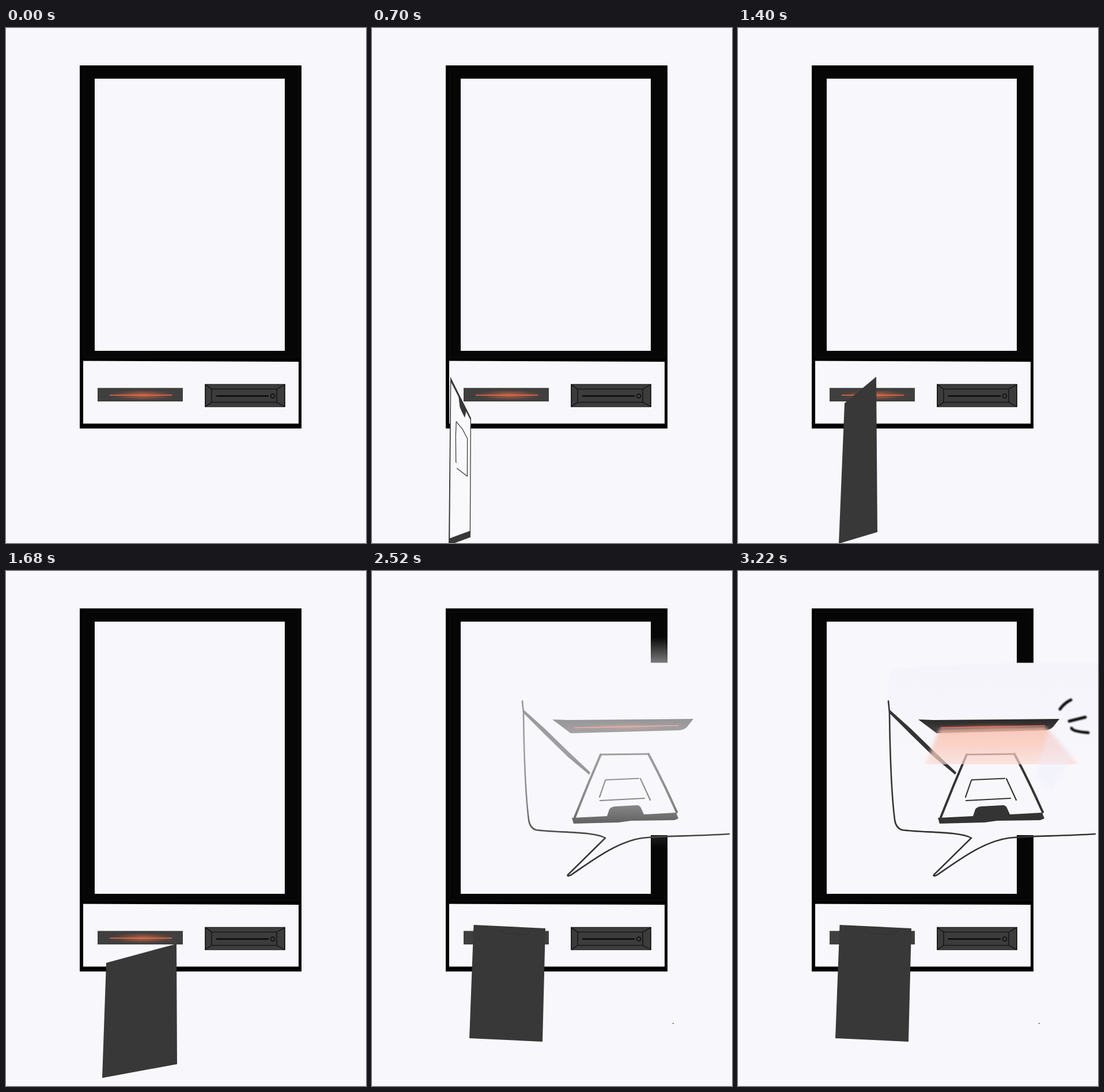
An HTML page for the animation above (3.36 s loop, 625x895 px).

```html
<!DOCTYPE html>
<html lang="en">
<head>
<meta charset="utf-8">
<title>Badge scan at a kiosk</title>
<style>
  html, body { margin: 0; width: 100%; height: 100%; overflow: hidden; background: #f8f8fc; }
  svg { display: block; width: 100vw; height: 100vh; }
  .ink { fill: none; stroke: #343434; stroke-linecap: round; stroke-linejoin: round; }
</style>
</head>
<body>
<svg viewBox="0 0 625 895">
  <defs>
    <radialGradient id="glow">
      <stop offset="0" stop-color="#e8744f" stop-opacity=".75"/>
      <stop offset=".5" stop-color="#b9603f" stop-opacity=".4"/>
      <stop offset="1" stop-color="#403f3f" stop-opacity="0"/>
    </radialGradient>
    <linearGradient id="panel" x2="0" y2="1">
      <stop offset="0" stop-color="#f4f4fa"/>
      <stop offset=".5" stop-color="#f5f5fb"/>
      <stop offset="1" stop-color="#f8f8fc"/>
    </linearGradient>
    <linearGradient id="haze" x2="0" y2="1">
      <stop offset="0" stop-color="#f8f8fc" stop-opacity="0"/>
      <stop offset=".12" stop-color="#f8f8fc" stop-opacity=".48"/>
      <stop offset=".55" stop-color="#f8f8fc" stop-opacity=".55"/>
      <stop offset=".8" stop-color="#f8f8fc" stop-opacity=".42"/>
      <stop offset=".94" stop-color="#f8f8fc" stop-opacity=".1"/>
      <stop offset="1" stop-color="#f8f8fc" stop-opacity="0"/>
    </linearGradient>
    <linearGradient id="bar" x2="0" y2="1">
      <stop offset="0" stop-color="#2a2a2a"/>
      <stop offset="1" stop-color="#454040"/>
    </linearGradient>
    <linearGradient id="beam" x2="0" y2="1">
      <stop offset="0" stop-color="#f9bda9" stop-opacity=".8"/>
      <stop offset=".5" stop-color="#fac9bb" stop-opacity=".78"/>
      <stop offset="1" stop-color="#fbdcd4" stop-opacity=".65"/>
    </linearGradient>
    <filter id="soft"><feGaussianBlur stdDeviation="3"/></filter>
    <filter id="smudge"><feGaussianBlur stdDeviation=".8"/></filter>
    <clipPath id="beamClip"><rect x="300" y="269" width="325" height="67"/></clipPath>
  </defs>

  <g id="kiosk">
    <path d="M128 65H513V696H128Z"/>
    <path d="M134 71H508V573H134Z" fill="#060606" stroke="#141616" stroke-width=".8"/>
    <path d="M154 88H484V561H154ZM134 578.5L508 580V687.5H134Z" fill="#f8f8fc"/>
    <path d="M159 625.500H307V649H159Z" fill="#403f3f"/>
    <ellipse cx="238" cy="638" rx="66" ry="11" fill="url(#glow)"/>
    <path d="M180 638H288" stroke="#ef6a4c" stroke-width="1.500"/>
    <g fill="#3c3c3d" stroke="#0a0a0a" stroke-width="1.200">
      <path d="M346 619.500H484V658H346Z" stroke-width="1.600"/>
      <path d="M346 619.500L357 627.500H470L484 619.500M346 658L357 650.500H470L484 658M357 627.500V650.500M470 627.500V650.500"/>
      <path d="M366 639.500H455" stroke-width="2.600" stroke-linecap="round"/>
      <circle cx="463" cy="639.500" r="3.500" stroke-width="1.500"/>
    </g>
  </g>

  <g id="badge">
    <polygon id="card" fill="#383838"/>
    <g id="front">
      <polygon id="sheet" fill="#f9f9fc"/>
      <polygon id="clip" fill="#383838"/>
      <path id="photo" class="ink" stroke-width="1.200"/>
    </g>
    <path id="notch" fill="none" stroke="#323232" stroke-width="1.500"/>
  </g>
  <path id="speck" d="M521.500 787L524 785.500" stroke="#555" stroke-width="1.200"/>

  <g data-from="17">
    <path d="M483.500 159.500H625V459H483.500Z" fill="#f8f8fc"/>
    <path data-from="19" d="M260 226L262 178Q264 171 285 169Q400 160 484 160H625V330H262Z" fill="url(#panel)"/>
    <path class="ink" stroke-width="2.600" d="M261 226L263 246C264 330 268 400 272 432Q274 447 285 450C320 455 385 452 405 464L340 528Q338 532 346 528C380 505 425 470 470 464C505 460 560 461 620 457"/>
    <path fill="#343434" d="M262 240L300 274L340 313L379 350L377 354L340 323L300 284L264 248Z"/>
    <path fill="url(#bar)" d="M313 258L340 259L558 257L547 271Q541 277 530 277L345 282Z"/>
    <ellipse cx="440" cy="271" rx="95" ry="8" fill="url(#glow)" opacity=".55"/>
    <path d="M352 272.500L533 268.500" stroke="#f0584c" stroke-width="1.500"/>
    <g class="ink" stroke-width="3">
      <path d="M397 319L480 318"/>
      <path d="M397 319Q374 372 352 428" stroke-width="4"/>
      <path d="M480 318Q505 365 529 419" stroke-width="4"/>
      <path d="M406 363L463 360.500M405 364L395 393M396 399L473 395M466 361L483 398" stroke-width="2.200"/>
    </g>
    <path fill="#343434" d="M347 429L408 426L412 414Q416 409 424 409L461 407Q466 408 468 414L472 423L528 420L532 430L525 433L450 434L428 437L350 439Z"/>
    <path data-from="18" data-to="19" d="M259 115H625V481H259Z" fill="url(#haze)"/>
    <g clip-path="url(#beamClip)">
      <path data-from="20" data-to="22" d="M352 273L531 270L542 336H333Z" fill="url(#beam)" filter="url(#soft)" id="narrow"/>
      <path data-from="22" d="M350 274L533 270L593 340H324Z" fill="url(#beam)" filter="url(#soft)"/>
    </g>
    <path data-from="22" d="M538 278L582 318L545 384L515 362Z" fill="#eeeefc" opacity=".4" filter="url(#soft)"/>
    <path data-from="23" class="ink" style="stroke:#111" stroke-width="5" filter="url(#smudge)" d="M559 240Q567 229 578 224M575 261L603 254M579 273Q581 279 608 281"/>
  </g>
</svg>
<script>
const STEP = 140, COUNT = 24, TURNED = 6, REST = 16;
const $ = id => document.getElementById(id);
const timed = [...document.querySelectorAll("[data-from]")];

// Card outlines, clockwise from top left, at successive steps of the turn
const turn = [
  [52,678, 190,684, 184,880, 47,874],
  [47,672, 188,692, 184,881, 41,891],
  [65,646, 180,707, 180,875, 60,896],
  [94,617, 177,698, 176,881, 90,899],
  [136,606, 172,678, 171,885, 133,899],
  [159,601, 170,620, 172,890, 156,896],
  [169,600, 179,602, 182,887, 167,889],
  [195,600, 206,600, 207,690, 205,770, 207,888, 205,894, 190,894, 185,885, 184,690],
  [194,625, 221,600, 224,884, 179,896],
  [185,652, 240,606, 242,876, 175,896],
  [177,670, 278,631, 279,865, 166,882],
  [174,681, 296,648, 297,857, 167,881]
].map(list => list.flatMap((x, i) => i % 2 ? [] : [[x, list[i + 1]]]));
const resting = [[176.500,615], [301,621], [296,818], [169,812]];

function outline(frame) {
  if (frame <= turn.length) return turn[frame - 1];
  const drop = 23 * Math.max(0, REST - frame);
  return resting.map(([x, y]) => [x, y + drop]);
}

const mix = (a, b, t) => a + (b - a) * t;
const onCard = ([tl, tr, br, bl]) => ([u, v]) =>
  [0, 1].map(i => mix(mix(tl[i], tr[i], u), mix(bl[i], br[i], u), v));
const show = (node, on) => { node.style.display = on ? "" : "none"; };
const setPoints = (id, points) => $(id).setAttribute("points", points.join(" "));
const lines = segments => segments.map(points => "M" + points.join("L")).join("");

function drawBadge(frame) {
  show($("badge"), frame > 0);
  if (!frame) return;
  const corners = outline(frame), place = onCard(corners);
  setPoints("card", corners);
  show($("front"), frame < TURNED);
  show($("notch"), frame > turn.length);
  setPoints("sheet", [[.04,.025], [.965,.025], [.965,.945], [.055,.96]].map(place));
  setPoints("clip", [[.39,.015], [.46,.075], [.54,.085], [.7,.09], [.76,.03], [.76,.015]].map(place));
  $("photo").setAttribute("d", lines([
    [[.3,.21], [.28,.3], [.3,.475], [.32,.475]],
    [[.33,.21], [.6,.2], [.83,.215], [.835,.51]],
    [[.35,.51], [.835,.51]]
  ].map(part => part.map(place))));
  $("notch").setAttribute("d", lines([[[.36,.03], [.43,.06], [.74,.06], [.8,.03]].map(place)]));
}

let shown = -1;
function draw(now) {
  const frame = Math.floor(now / STEP) % COUNT;
  if (frame !== shown) {
    shown = frame;
    drawBadge(frame);
    for (const node of timed)
      show(node, frame >= +node.dataset.from && frame < +(node.dataset.to || COUNT));
    $("narrow").style.opacity = frame === 20 ? .6 : .9;
    show($("speck"), frame >= 14);
    $("speck").setAttribute("transform", `translate(0 ${23 * Math.max(0, REST - frame)})`);
  }
  requestAnimationFrame(draw);
}
requestAnimationFrame(draw);
</script>
</body>
</html>
```
